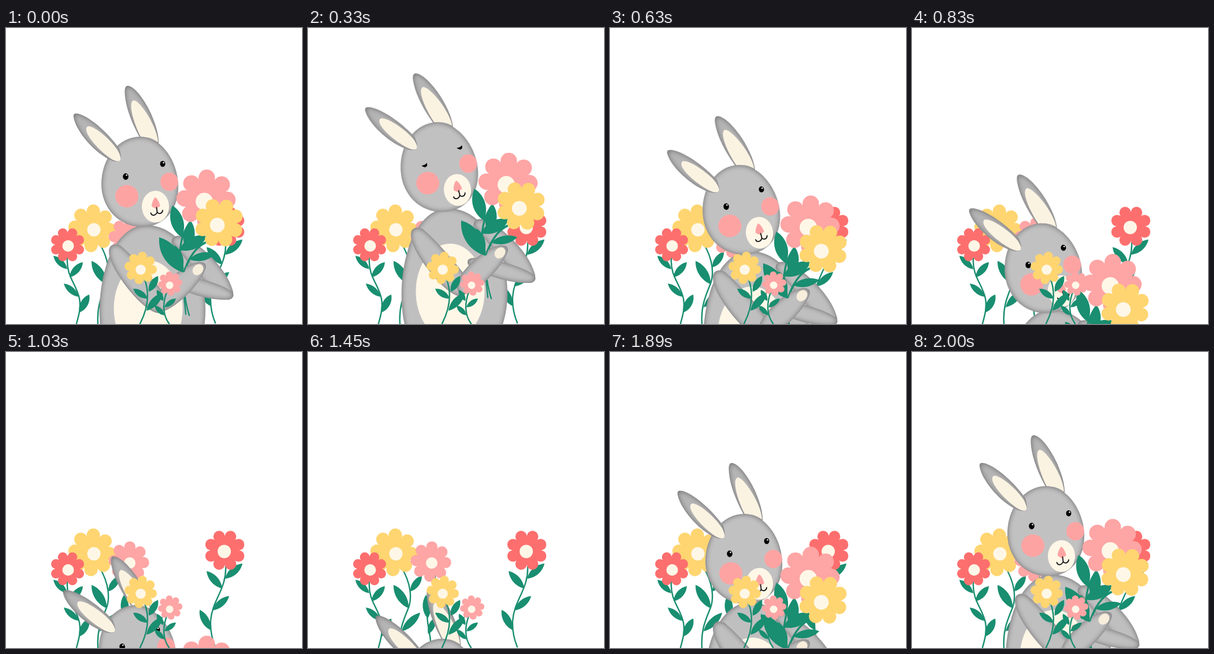
An HTML page that plays this animation: 512 by 512 pixels, repeating every 2110 ms.

```html
<!DOCTYPE html>
<html lang="en">
<head>
<meta charset="utf-8">
<title>Rabbit with flowers</title>
<style>
html, body { margin: 0; width: 100%; height: 100%; overflow: hidden; background: #fff; }
svg { display: block; width: 100vw; height: 100vh; }
</style>
</head>
<body>
<svg viewBox="0 0 512 512">
  <defs>
    <!-- soft dark rim inside a shape -->
    <filter id="fur" x="-5%" y="-5%" width="110%" height="110%" color-interpolation-filters="sRGB">
      <feGaussianBlur in="SourceAlpha" stdDeviation="5"/>
      <feComponentTransfer result="inv"><feFuncA type="table" tableValues="1 0"/></feComponentTransfer>
      <feFlood flood-color="#656465"/>
      <feComposite in2="inv" operator="in"/>
      <feComposite in2="SourceAlpha" operator="in" result="rim"/>
      <feMerge><feMergeNode in="SourceGraphic"/><feMergeNode in="rim"/></feMerge>
    </filter>
    <clipPath id="headClip"><path id="headShape" d="M232 188C268 188 298 230 298 275C298 316 271 344 236 344C195 344 165 311 165 270C165 225 195 188 232 188Z"/></clipPath>
  </defs>

  <g id="back"></g>

  <g id="rabbit">
    <g fill="#c0bfc0">
      <path filter="url(#fur)" d="M242 341C214 341 187 366 173 412C159 458 159 510 168 545C185 600 320 600 337 541C350 500 347 450 328 408C305 362 275 341 242 341Z"/>
      <ellipse cx="246" cy="485" rx="59.500" ry="83" fill="#fef7e7"/>
      <path filter="url(#fur)" d="M287 366C290 358 301 358 312 363C350 384 386 425 393 457C394 468 380 468 366 460C340 440 314 402 294 380C288 374 285 371 287 366Z"/>
      <path filter="url(#fur)" d="M276 434C276 427 284 426 296 427C335 430 374 444 391 456C396 462 393 469 384 470C350 471 315 459 288 446C280 442 276 439 276 434Z"/>
    </g>

    <g id="head">
      <path fill="#b6b5b6" filter="url(#fur)" d="M211 100C223 101 241 126 252 151C260 170 264 184 264 200L234 194C216 163 205 131 205.500 108C206 102 208 100 211 100Z"/>
      <path fill="#fbf3e2" d="M221 125C233 126 262 172 263 198Q248 186 234 190C221 166 210 128 221 125Z"/>
      <use href="#headShape" fill="#c2c1c2" filter="url(#fur)"/>
      <path fill="#b6b5b6" filter="url(#fur)" d="M120 148C136 146 176 179 196 209C199 218 201 229 193 231C185 232 170 224 155 211C136 194 119 170 117 154Q116 149 120 148Z"/>
      <path fill="#fbf3e2" d="M142 170C154 169 184 196 194 213C200 225 200 231 192 230.500C178 229 136 188 139 174Q139 171 142 170Z"/>
      <g clip-path="url(#headClip)" fill="#fda4a3">
        <ellipse cx="209" cy="291" rx="20" ry="19.500"/>
        <ellipse cx="282.500" cy="266" rx="15.500" ry="16"/>
      </g>
      <ellipse cx="258.500" cy="309" rx="23.500" ry="27.500" fill="#fef7e7"/>
      <path fill="#fda4a3" d="M258.500 293C261 293 266 303 266.500 307C267 310 262 309 259 313C257 310 252 311 252 307C252 303 256 293 258.500 293Z"/>
      <path fill="none" stroke="#111" stroke-width="1.800" stroke-linecap="round" d="M250.500 320C252 325.500 259 325 261.500 318.500C263.500 322 270 322 271 315.500M261.500 318.500L260.500 310.500"/>
      <g id="open">
        <ellipse cx="207" cy="257" rx="4.800" ry="5.700"/>
        <ellipse cx="271" cy="235" rx="4.500" ry="5.200"/>
        <g fill="#fff"><circle cx="208.500" cy="254.500" r="1.300"/><circle cx="272.500" cy="233" r="1.300"/></g>
      </g>
      <g id="closed">
        <path id="lid" d="M202 259.500Q208 260 211.500 256Q213 261.500 209 263Q205 263.500 202 259.500Z"/>
        <use href="#lid" x="64" y="-23"/>
      </g>
    </g>

    <g id="stems"></g>

    <g fill="#c0bfc0">
      <path filter="url(#fur)" d="M178 386C178 374 190 371 200 378C223 398 250 429 272 457C282 470 276 492 262 493C240 489 208 450 192 424Q178 401 178 386Z"/>
      <path filter="url(#fur)" d="M259 483C252 468 269 448 288 430C302 417 318 407 332 405C343 404 348 409 345 417C337 439 312 466 288 482C274 491 263 494 259 483Z"/>
      <ellipse cx="332" cy="418" rx="8.500" ry="10.500" transform="rotate(42 332 418)" fill="#f7eedb"/>
    </g>
    <g id="bouquet"></g>
  </g>

  <g id="front"></g>
</svg>
<script>
const $ = id => document.getElementById(id);
const GREEN = '#198e70', PINK = '#fea5a5', RED = '#fc6f6e', YELLOW = '#fed570', CREAM = '#fef7e7';

const stem = d => `<path d="${d}" fill="none" stroke="${GREEN}" stroke-width="2.400" stroke-linecap="round"/>`;

// pointed oval from (x1,y1) to (x2,y2), w wide
function leaf(x1, y1, x2, y2, w) {
  const dx = x2 - x1, dy = y2 - y1, len = Math.hypot(dx, dy);
  const nx = -dy / len * w * .72, ny = dx / len * w * .72;
  const at = (k, side) => `${x1 + dx * k + nx * side} ${y1 + dy * k + ny * side}`;
  return `<path fill="${GREEN}" d="M${x1} ${y1}C${at(.3, 1)} ${at(.7, 1)} ${x2} ${y2}C${at(.7, -1)} ${at(.3, -1)} ${x1} ${y1}Z"/>`;
}

// eight round petals and a cream heart at (hx,hy)
function flower(x, y, r, color, turn, hx, hy, hr) {
  let s = `<g fill="${color}"><circle cx="${x}" cy="${y}" r="${r * .72}"/>`;
  for (let i = 0; i < 8; i++) {
    const a = (i * 45 + turn) * Math.PI / 180;
    s += `<circle cx="${x + r * .725 * Math.sin(a)}" cy="${y - r * .725 * Math.cos(a)}" r="${r * .28}"/>`;
  }
  return s + `</g><circle cx="${hx}" cy="${hy}" r="${hr}" fill="${CREAM}"/>`;
}

$('back').innerHTML = [
  stem('M162 373C178 400 180 425 174 442C166 462 157 480 159 511'),
  leaf(148, 403, 174, 443, 14), leaf(197, 387, 177, 414, 11), leaf(194, 451, 162, 483, 12),
  flower(149, 346.5, 41, YELLOW, 4, 152, 349, 11.5),
  stem('M220 385C222 405 206 425 206 452C206 472 210 480 212 500'),
  leaf(204, 420, 207, 461, 13), leaf(220, 459, 208, 488, 10),
  flower(212.5, 362.5, 35, PINK, 4, 214, 365, 10),
  stem('M380 370C382 410 356 430 354 465C353 485 357 498 362 510'),
  leaf(409, 366, 379, 392, 12), leaf(347, 379, 374, 409, 12),
  leaf(386, 422, 357, 447, 11), leaf(335, 446, 354, 481, 12),
  flower(378.5, 343, 35.5, RED, 22.5, 377.5, 345, 11.5),
  stem('M106 398C104 430 122 443 127 468C130 485 125 500 122 511'),
  leaf(82, 394, 106, 417, 10), leaf(133, 405, 110, 431, 11),
  leaf(100, 442, 126, 465, 10), leaf(144, 461, 127, 492, 12),
  flower(106.5, 375, 30, RED, 22.5, 107.5, 377, 10)
].join('');

$('stems').innerHTML =
  stem('M327 325C300 352 296 390 304 425Q308 465 311 495') +
  stem('M345 372C318 385 304 425 308 450Q310 475 317 497');

$('bouquet').innerHTML = [
  stem('M327 325C310 342 300 365 301 405'),
  stem('M345 370C328 378 314 400 308 421'),
  leaf(288, 307, 304, 362, 20), leaf(320, 334, 313, 383, 18),
  leaf(265, 362, 307, 423, 25), leaf(292, 376, 304, 419, 15),
  leaf(347, 360, 300, 384, 19), leaf(362, 391, 317, 400, 13),
  flower(346, 296, 51, PINK, 2, 343, 300, 15),
  flower(368.5, 337, 42.5, YELLOW, 24, 365.5, 341, 12.8)
].join('');

$('front').innerHTML = [
  stem('M240 435C247 455 248 480 232 511'),
  leaf(263, 429, 247, 456, 11), leaf(220, 451, 245, 468, 10), leaf(271, 458, 243, 489, 12),
  flower(233, 415, 28, YELLOW, 8, 233, 418, 8.8),
  stem('M278 457C270 478 272 498 282 511'),
  leaf(294, 468, 274, 483, 8), leaf(261, 453, 272, 472, 8), leaf(257, 480, 274, 497, 8),
  flower(284, 442, 21, PINK, -6, 283, 445, 6.5)
].join('');

// start ms, vertical shift, head tilted, eyes shut
const LOOP = 2110;
const poses = [
  [0, 0, 0, 0], [110, -29, 0, 0], [330, -29, 1, 1], [530, -4, 1, 0],
  [630, 45, 1, 0], [730, 95, 1, 0], [830, 146, 1, 0], [930, 196, 1, 0],
  [1030, 246, 1, 0], [1130, 296, 1, 0], [1230, 346, 1, 0],
  [1450, 308, 0, 0], [1560, 243, 0, 0], [1670, 177, 0, 0],
  [1780, 134, 0, 0], [1890, 92, 0, 0], [2000, 44, 0, 0]
];
let shown;

function draw(ms) {
  const pose = poses.filter(p => p[0] <= ms).pop();
  if (pose === shown) return;
  shown = pose;
  const [, dy, tilted, shut] = pose;
  $('rabbit').setAttribute('transform', `translate(0 ${dy})`);
  $('head').setAttribute('transform', `rotate(${tilted ? -7 : 0} 260 309)`);
  $('open').style.display = shut ? 'none' : '';
  $('closed').style.display = shut ? '' : 'none';
}

const start = performance.now();
function tick() {
  draw((performance.now() - start) % LOOP);
  requestAnimationFrame(tick);
}
tick();
</script>
</body>
</html>
```
